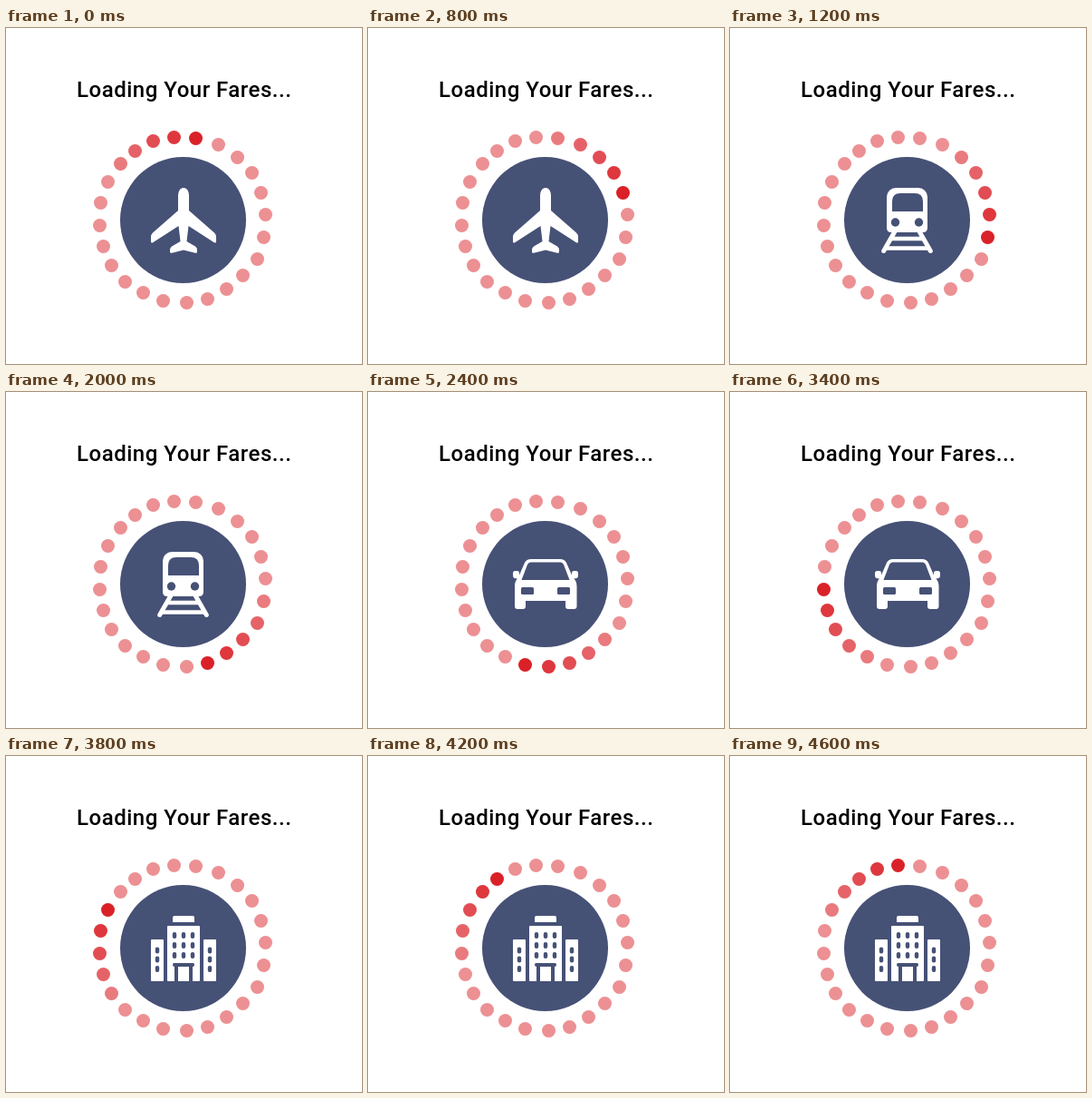
An HTML page that plays this animation: 393 px wide and 370 px high, repeating every 4800 ms.

```html
<!DOCTYPE html>
<html lang="en">
<head>
<meta charset="utf-8">
<title>Loading</title>
<style>
  html, body { margin: 0; width: 100%; height: 100%; overflow: hidden; background: #fff; }
  svg { display: block; width: 393px; height: 370px; }
  text { font: 500 24px Roboto, sans-serif; letter-spacing: .5px; }
  .icon { fill: #fff; }
  .cut { fill: #465176; }
</style>
</head>
<body>
<svg viewBox="0 0 393 370">
  <text x="78" y="76">Loading Your Fares...</text>
  <g id="dots" fill="#da2128"></g>
  <circle class="cut" cx="195.5" cy="211.5" r="69.5"/>

  <g class="icon">
    <path d="M196 176C192 176 190 180 190 185V201L162 225.500Q160 227.500 160 230V235Q160 237.500 162.500 236L190.500 218L192.500 235L183 240.500Q181 242 181 244V246.500Q181 248.200 183 247.700L196 244.500L209 247.700Q211 248.200 211 246.500V244Q211 242 209 240.500L199.500 235L201.500 218L229.500 236Q232 237.500 232 235V230Q232 227.500 230 225.500L202 201V185C202 180 200 176 196 176Z"/>
  </g>

  <g class="icon">
    <rect x="173" y="176" width="45" height="49" rx="10"/>
    <path d="M173 200H218V220Q218 225 213 225H178Q173 225 173 220Z"/>
    <path class="cut" d="M179 202V191Q179 182 188 182H204Q213 182 213 191V202Z"/>
    <circle class="cut" cx="182.500" cy="214" r="4.700"/>
    <circle class="cut" cx="208.500" cy="214" r="4.700"/>
    <path d="M182 224L169.700 245.500M209 224L221.300 245.500" stroke="#fff" stroke-width="5" stroke-linecap="round"/>
    <path d="M178 232H213M172 242.500H219" stroke="#fff" stroke-width="4.500"/>
  </g>

  <g class="icon">
    <path d="M180 184H212Q217 184 219 188L226 204Q230.500 208 230.500 214V236Q230.500 239 227.500 239H221Q218 239 218 236V230H174V236Q174 239 171 239H165Q162 239 162 236V214Q162 208 166 204L173 188Q175 184 180 184Z"/>
    <path d="M167 206L161.500 205Q160 204.500 160 202V199.500Q160 197 162.500 197H164.500Q167 197 167 199ZM225 206L230.500 205Q232 204.500 232 202V199.500Q232 197 229.500 197H227.500Q225 197 225 199Z"/>
    <path class="cut" d="M179.500 187.500H212.500Q215 187.500 216 190L222.500 207H169.500L176 190Q177 187.500 179.500 187.500Z"/>
    <rect class="cut" x="169" y="215" width="14" height="8" rx="1.500"/>
    <rect class="cut" x="209" y="215" width="14" height="8" rx="1.500"/>
  </g>

  <g class="icon" id="building">
    <path d="M184 183V178Q184 176 186 176H206Q208 176 208 178V183Z"/>
    <rect x="160" y="202" width="14" height="46" rx="1"/>
    <rect x="178" y="187" width="36" height="61" rx="1"/>
    <rect x="218" y="202" width="14" height="46" rx="1"/>
    <path class="cut" d="M185.500 228H206.500Q208 228 208 230Q208 232 206 232V248H202V232H190V248H186V232Q184 232 184 230Q184 228 185.500 228Z"/>
  </g>
</svg>

<script>
const STEP = 200, COUNT = 24, TRAIL = 5;
const NS = 'http://www.w3.org/2000/svg';

function add(parent, tag, attrs) {
  const el = document.createElementNS(NS, tag);
  for (const key in attrs) el.setAttribute(key, attrs[key]);
  return parent.appendChild(el);
}

// Slightly uneven ring, clockwise from the top
const ring = [
  [209, 121], [234, 128], [255, 142], [271, 159], [281, 181], [286, 205],
  [284, 230], [277, 254], [261, 272], [243, 287], [222, 298], [199, 302],
  [173, 300], [151, 291], [131, 279], [116, 261], [107, 240], [103, 217],
  [104, 192], [112, 169], [126, 149], [142, 135], [162, 124], [185, 120]
];
const dots = ring.map(([x, y]) =>
  add(document.getElementById('dots'), 'circle', { cx: x + .5, cy: y + .5, r: 7.5 }));

const building = document.getElementById('building');
function addWindows(columns, rows) {
  for (const x of columns) for (const y of rows)
    add(building, 'rect', { class: 'cut', x: x - 2.2, y: y - 3.5, width: 4.4, height: 7, rx: 2 });
}
addWindows([186, 196, 206], [197.5, 208.5, 219.5]);
addWindows([167, 225], [214, 224, 234.5]);

const icons = document.querySelectorAll('.icon');

function draw(time) {
  const head = Math.floor(time / STEP) % COUNT;
  dots.forEach((dot, i) => {
    const age = (head - i + COUNT) % COUNT;
    dot.setAttribute('opacity', 1 - Math.min(age, TRAIL) * .1);
  });
  const shown = Math.floor(head / (COUNT / icons.length));
  icons.forEach((icon, i) => icon.setAttribute('visibility', i === shown ? 'visible' : 'hidden'));
}

const start = performance.now();
function tick() {
  draw(performance.now() - start);
  requestAnimationFrame(tick);
}
tick();
</script>
</body>
</html>
```
